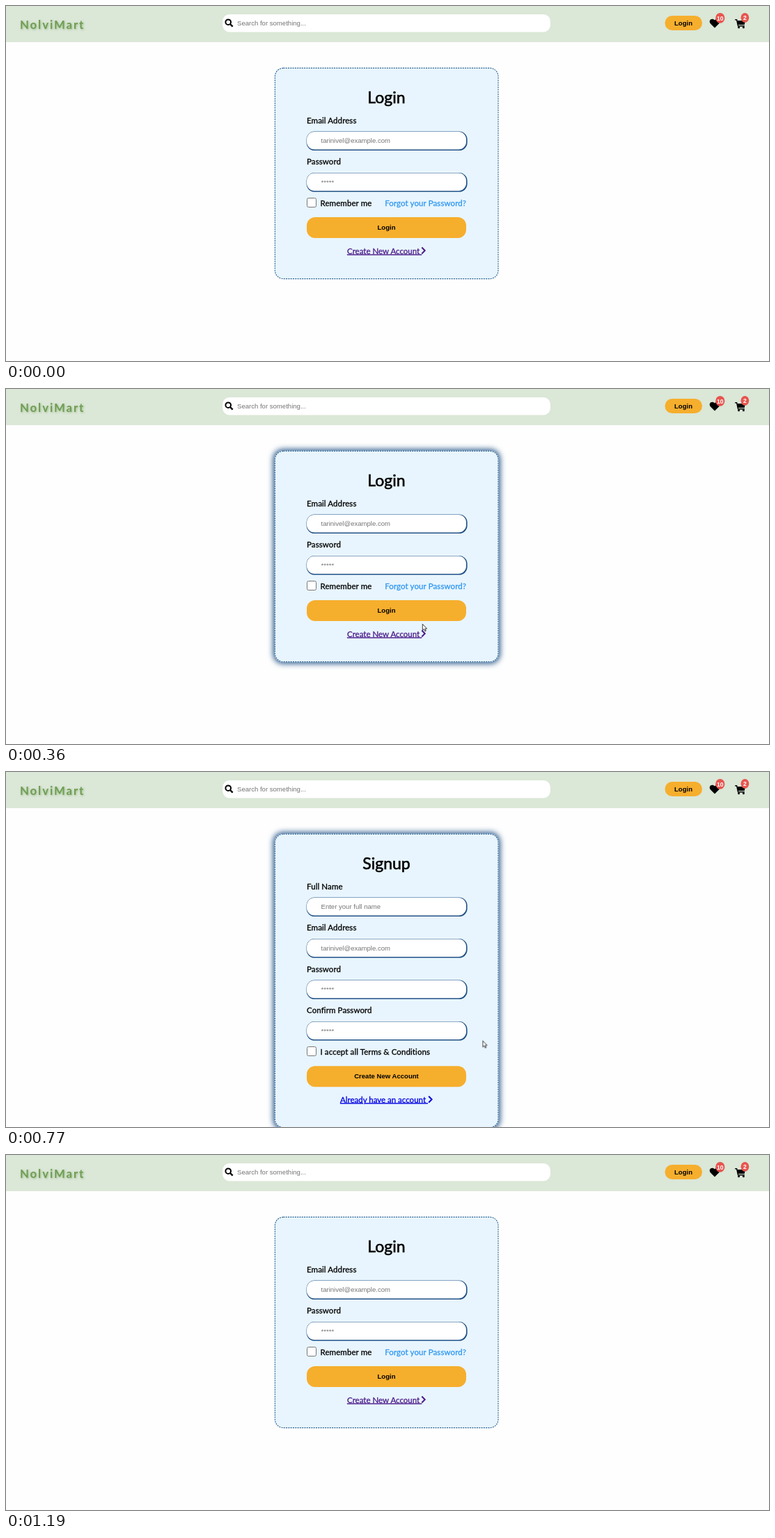
Write an HTML page that moves like this. It is 1096 px wide and 511 px high and loops after 1320 ms.

```html
<!DOCTYPE html>
<html lang="en">
<head>
<meta charset="utf-8">
<title>Login and signup</title>
<style>
html, body { margin: 0; width: 100%; height: 100%; overflow: hidden; background: #fefefe; }
svg { display: block; width: 1096px; height: 511px; }

text { font: 9.57px "Liberation Sans", Arial, sans-serif; fill: #000; }
.label, .title { font: 11.5px Lato, "Noto Sans", sans-serif; stroke: currentColor; stroke-width: .3px; }
.label { letter-spacing: .1px; }
.title { font-size: 23px; stroke-width: .6px; text-anchor: middle; }
.hint { fill: #757575; }
.action { font-weight: 700; text-anchor: middle; }
.brand { font: 700 16.8px Lato, "Noto Sans", sans-serif; letter-spacing: 1.9px; fill: #6f9d55; filter: drop-shadow(1.5px 1.5px 1.5px #6f9d5599); }
.badge { font-weight: 700; font-size: 8.6px; text-anchor: middle; fill: #fff; }
.forgot { fill: #2f97f0; color: #2f97f0; text-anchor: end; }
.link { fill: currentColor; text-decoration: underline; letter-spacing: 0; }
.visited { color: #4b1a87; }
.fresh { color: #0000e0; }
.chevron { fill: none; stroke: currentColor; stroke-width: 2; }
.orange { fill: #f6ae2d; }
.red { fill: #e7554f; }
.card { fill: #e8f5fe; }
.edge { fill: none; stroke: #2c628f; stroke-width: 1.1; stroke-dasharray: 2 1.3; }
.halo { fill: #1f4f84; filter: blur(4.5px); }
.shade { fill: #1f5086; filter: blur(.6px); }
.box { fill: #fff; stroke: #767676; }
.glow { fill: #4f9a3c; filter: blur(1.4px); }
.status rect { fill: #76bd7d; }
.status text { font: 8px "Noto Sans", "Open Sans", sans-serif; fill: #3f4a41; }

.login, .signup, .halo, .glow, .status, #cursor, #hand, #arrow { animation: 1320ms step-end infinite; }
.login { animation-name: login; }
.signup { animation-name: signup; }
.halo { animation-name: hover; }
.login .glow { animation-name: loginGlow; }
.signup .glow { animation-name: signupGlow; }
.login .status { animation-name: loginStatus; }
.signup .status { animation-name: signupStatus; }
#cursor { animation-name: hover, move; }
#hand { animation-name: hand; }
#arrow { animation-name: arrow; }

@keyframes login { 0%, 90.1% { opacity: 1 } 37.1% { opacity: 0 } }
@keyframes signup { 0%, 90.1% { opacity: 0 } 37.1% { opacity: 1 } }
@keyframes hover { 0%, 90.1% { opacity: 0 } 5.3% { opacity: 1 } }
@keyframes loginGlow { 0%, 26.5% { opacity: 0 } 10.6% { opacity: 1 } }
@keyframes signupGlow { 0%, 72.7% { opacity: 0 } 68.1% { opacity: 1 } }
@keyframes loginStatus { 0%, 37.1% { opacity: 0 } 31.8% { opacity: .78 } }
@keyframes signupStatus { 0%, 90.1% { opacity: 0 } 78% { opacity: 1 } }
@keyframes hand {
  0%, 26.5%, 37.1%, 72.7% { opacity: 0 }
  10.6%, 31.8%, 68.1%, 78% { opacity: 1 }
}
@keyframes arrow {
  0%, 26.5%, 37.1%, 72.7% { opacity: 1 }
  10.6%, 31.8%, 68.1%, 78% { opacity: 0 }
}
@keyframes move {
  0%, 5.3% { transform: translate(662px, 294px) }
  10.6% { transform: translate(620px, 318px) }
  15.9% { transform: translate(600.5px, 323px) }
  21.2% { transform: translate(600px, 325px) }
  26.5% { transform: translate(598px, 338px) }
  31.8% { transform: translate(595.5px, 357.5px) }
  37.1% { transform: translate(681px, 386px) }
  58.3% { transform: translate(684.5px, 386.5px) }
  63.6% { transform: translate(671px, 400px) }
  68.1% { transform: translate(640px, 428px) }
  72.7% { transform: translate(600px, 457px) }
  78% { transform: translate(570.5px, 471.5px) }
}
</style>
</head>
<body>
<svg viewBox="0 0 1096 511">
  <defs>
    <g id="field">
      <rect class="shade" x="431.6" y="180.6" width="231" height="27.4" rx="11.5"/>
      <rect x="432" y="181" width="229" height="25.5" rx="11" fill="#fff"/>
    </g>
    <rect id="check" class="box" x="432.5" y="276.5" width="13" height="13" rx="2"/>
    <rect id="button" x="432" y="304" width="229" height="30" rx="12"/>
    <path id="chevron" class="chevron" d="M0 0l4.4 4.5-4.4 4.5"/>
  </defs>

  <rect width="1096" height="52" fill="#dbe7d7"/>
  <text class="brand" x="20" y="32.5">NolviMart</text>
  <rect x="311" y="12" width="471" height="25.5" rx="10" fill="#fff"/>
  <g fill="none" stroke="#000" stroke-width="2">
    <circle cx="319.2" cy="23.2" r="3.8"/>
    <path d="M322 26l3.6 3.6" stroke-width="2.4"/>
  </g>
  <text class="hint" x="332" y="27.5">Search for something...</text>
  <rect class="orange" x="946.5" y="14" width="53.5" height="21" rx="10.5"/>
  <text class="action" x="973" y="27.7">Login</text>
  <path d="M1018 31.5l-6-6c-2-2-1.5-5 .5-6.2 2-1.1 4-.4 5.5 1.2 1.5-1.6 3.5-2.3 5.5-1.2 2 1.2 2.5 4.2 .5 6.2z"/>
  <ellipse class="red" cx="1025.8" cy="17.3" rx="6.6" ry="7.4"/>
  <text class="badge" x="1025.8" y="20.6">10</text>
  <path d="M1050 21h12l-1.3 6h-9.5z"/>
  <path d="M1047.2 19.7h2.4l2 9h9.2" fill="none" stroke="#000" stroke-width="1.5"/>
  <circle cx="1052.6" cy="30.8" r="1.5"/>
  <circle cx="1059.4" cy="30.8" r="1.5"/>
  <ellipse class="red" cx="1061.4" cy="16.8" rx="5.9" ry="6.9"/>
  <text class="badge" x="1061.4" y="20">2</text>

  <g class="login">
    <rect class="halo" x="384" y="87" width="325.5" height="308" rx="14"/>
    <rect class="card" x="385.8" y="88.8" width="321.8" height="304.4" rx="12.5"/>
    <rect class="edge" x="386.4" y="89.4" width="320.6" height="303.2" rx="12"/>
    <text class="title" x="546.5" y="139.5">Login</text>
    <text class="label" x="432" y="168.5">Email Address</text>
    <use href="#field"/>
    <text class="hint" x="452.5" y="197">tarinivel@example.com</text>
    <text class="label" x="432" y="228">Password</text>
    <use href="#field" y="59.5"/>
    <text class="hint" x="452.5" y="256.5">*****</text>
    <use href="#check"/>
    <text class="label" x="451.5" y="288">Remember me</text>
    <text class="label forgot" x="661" y="288">Forgot your Password?</text>
    <use href="#button" class="glow"/>
    <use href="#button" class="orange"/>
    <text class="action" x="546.5" y="322">Login</text>
    <g class="visited">
      <text class="label link" x="490" y="356.5">Create New Account&nbsp;</text>
      <use href="#chevron" x="597.3" y="347.5"/>
    </g>
    <g class="status">
      <rect x="-4" y="498" width="227" height="20" rx="2"/>
      <text x="0" y="508.5">https://nolvimarts.netlify.app/authentication/Signup.html</text>
    </g>
  </g>

  <g class="signup">
    <rect class="halo" x="384" y="87" width="325.5" height="427.5" rx="14"/>
    <rect class="card" x="385.8" y="88.8" width="321.8" height="423.4" rx="12.5"/>
    <rect class="edge" x="386.4" y="89.4" width="320.6" height="422.2" rx="12"/>
    <text class="title" x="546.5" y="139.5">Signup</text>
    <text class="label" x="432" y="168.5">Full Name</text>
    <use href="#field"/>
    <text class="hint" x="452.5" y="197">Enter your full name</text>
    <text class="label" x="432" y="228">Email Address</text>
    <use href="#field" y="59.5"/>
    <text class="hint" x="452.5" y="256.5">tarinivel@example.com</text>
    <text class="label" x="432" y="287.5">Password</text>
    <use href="#field" y="119"/>
    <text class="hint" x="452.5" y="316">*****</text>
    <text class="label" x="432" y="347">Confirm Password</text>
    <use href="#field" y="178.5"/>
    <text class="hint" x="452.5" y="375.5">*****</text>
    <use href="#check" y="119"/>
    <text class="label" x="451.5" y="407">I accept all Terms &amp; Conditions</text>
    <use href="#button" class="glow" y="119.3"/>
    <use href="#button" class="orange" y="119.3"/>
    <text class="action" x="546.5" y="441.3">Create New Account</text>
    <g class="fresh">
      <text class="label link" x="480" y="475.5">Already have an account&nbsp;</text>
      <use href="#chevron" x="607.2" y="466.7"/>
    </g>
    <g class="status">
      <rect x="-4" y="498" width="221.5" height="20" rx="2"/>
      <text x="0" y="508.5">https://nolvimarts.netlify.app/authentication/Login.html</text>
    </g>
  </g>

  <g id="cursor" fill="#fff" stroke="#222" stroke-width=".9" stroke-linejoin="round">
    <path id="arrow" d="M.3 .4v9l2.1-1.9 1.5 3.2 1.4-.6-1.4-3.1h2.7z"/>
    <path id="hand" d="M-1 7.8V1.2q0-1 .9-1t.9 1v3.2q1.6-.5 1.9.5 1.4-.4 1.8.6 1.3-.2 1.3 1v2.6q0 1.6-1 2.7v1.3H-.4v-1.2q-1.6-1.6-2.9-3.9-.3-1 .6-1.2.8 0 1.7 1z"/>
  </g>
</svg>
</body>
</html>
```
